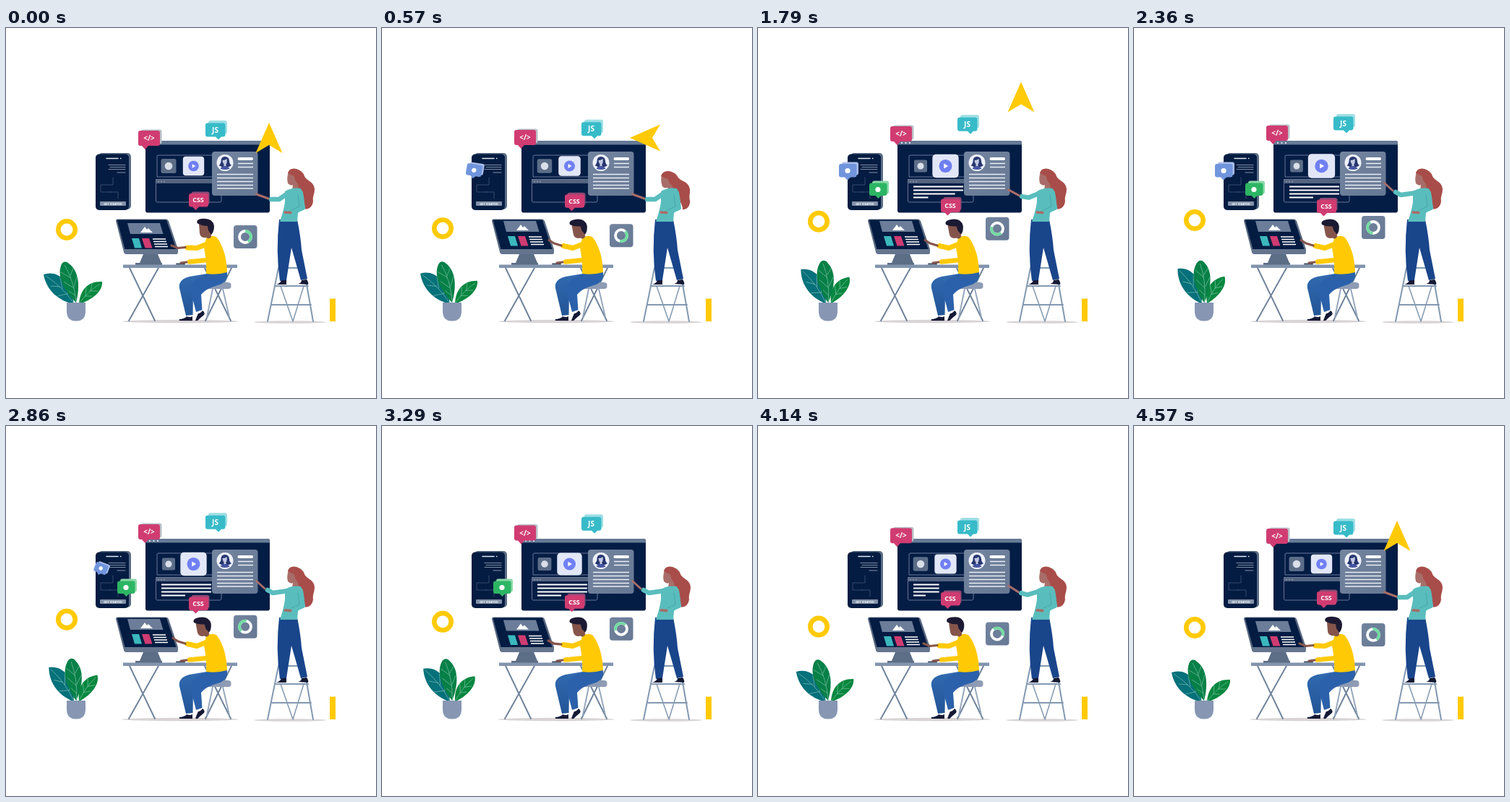
Write an HTML page that moves like this. It is 512 px wide and 512 px high and loops after 4640 ms.

```html
<!DOCTYPE html>
<html lang="en">
<head>
<meta charset="utf-8">
<title>Design team</title>
<style>
html, body { margin: 0; width: 100%; height: 100%; overflow: hidden; background: #fff }
svg { display: block; width: 100%; height: 100% }
text { font: 700 10px "Open Sans", "Noto Sans", sans-serif; fill: #fff; text-anchor: middle }
.line { fill: none; stroke-linecap: round; stroke-linejoin: round }
.vein { fill: none; stroke: #a9d6c6; stroke-width: .5 }
.skin { stroke: #a86d68 }
.tan { stroke: #85554b }
.teal { stroke: #5abdbd }
.gold { stroke: #ffca05 }
</style>
</head>
<body>
<svg viewBox="0 0 512 512">
  <defs>
    <linearGradient id="slate" x2="1" y2="1"><stop stop-color="#73849f"/><stop offset="1" stop-color="#667893"/></linearGradient>
    <linearGradient id="denim" x2="0" y2="1"><stop stop-color="#326bb2"/><stop offset="1" stop-color="#225596"/></linearGradient>
    <clipPath id="screen"><path d="M153 265H222L236 306H164Z"/></clipPath>
  </defs>

  <ellipse cx="241" cy="406" rx="81" ry="2.2" fill="#d8d4d5"/>
  <ellipse cx="393" cy="407" rx="50" ry="1.8" fill="#d8d4d5"/>
  <path fill="#ffca05" d="M448 374.5h8v31.5h-8z"/>
  <circle id="ring" cx="84" cy="279" r="11.700" fill="none" stroke="#ffca05" stroke-width="6.600"/>

  <!-- plant -->
  <g id="leafL">
    <path fill="#06717a" d="M94 382C74 378 56 364 52 341C69 335 88 346 94 382Z"/>
    <path class="vein" d="M93 380Q78 358 55 343M78 361L75 345M85 369L85 355M75 358L62 357M84 368L71 371"/>
  </g>
  <g id="leafR">
    <path fill="#07873f" d="M101 382C102 363 113 350 133 351C134 364 120 376 101 382Z"/>
    <path class="vein" d="M102 380Q115 363 130 354M110 370L111 359M117 363L119 354M109 371L119 371M116 364L127 364"/>
  </g>
  <g id="leafM">
    <path fill="#078047" d="M97 380C84 367 70 347 76 329C78 323 83 322 87 326C101 336 103 358 97 380Z"/>
    <path class="vein" d="M97 378Q94 350 81 328M94 358L98 344M89 343L93 332M94 360L80 351M90 346L76 338M96 370L87 364"/>
  </g>
  <path fill="#8797b3" d="M84 380h26v12q0 13.500-13 13.500t-13-13.500z"/>

  <!-- phone -->
  <rect x="128" y="173" width="45" height="78" rx="5" fill="#5b6c86"/>
  <rect x="124" y="174.500" width="46" height="77.500" rx="5" fill="#041c41"/>
  <path class="line" stroke="#dfe5ef" d="M139 180.500h16M158.500 180.500h.5" stroke-width="1.500"/>
  <path class="line" stroke="#8e9cb3" stroke-width=".9" d="M142 189.500h23M144 192.500h21M142 195.500h23M154 200h11"/>
  <path class="line" stroke="#3c4f70" stroke-width=".9" d="M148 207v10h-17v10h14M143 227h12v9"/>
  <rect x="130" y="240" width="36" height="6" rx="1" fill="#8292aa"/>
  <text x="148" y="244.600" style="font-size:4px">GET STARTED</text>

  <!-- board -->
  <rect x="193" y="156" width="172" height="99.500" rx="3" fill="#031d45"/>
  <path fill="#667a96" d="M193 161.500v-2.500q0-3 3-3h166q3 0 3 3v2.500z"/>
  <path class="line" stroke="#fff" stroke-width="2" d="M199 159h0M204.500 159h0M210 159h0"/>
  <path fill="none" stroke="#777f9f" stroke-width=".9" d="M290 176H211q-2 0-2 2V206H290M207.500 209.500H298V239q0 2-2 2H209.500q-2 0-2-2z"/>
  <path fill="#53647f" d="M208 210h90v5h-90z"/>
  <path class="line" stroke="#c4cddb" stroke-width="1.300" d="M211 212.500h0M215 212.500h0M219 212.500h0"/>
  <path id="typed" fill="none" stroke="#fff" stroke-width="1.800"/>
  <g id="photo">
    <rect x="-10.500" y="-10" width="21" height="20" rx="2.500" fill="#5c6d88"/>
    <circle r="5.300" fill="#d9dfe8"/>
  </g>
  <g id="video">
    <rect x="-14.700" y="-13.200" width="29.400" height="26.400" rx="4" fill="#e2e7f8"/>
    <circle r="7.300" fill="#7080f2"/>
    <path fill="#fff" d="M-1.800-2.800L2.900 0-1.800 2.800z"/>
  </g>
  <rect x="285" y="171" width="63.500" height="61" rx="4" fill="url(#slate)"/>
  <circle cx="303" cy="186.500" r="11.500" fill="#eef1fa"/>
  <path fill="#27366f" d="M294.500 190q3-2 3-6q0-6 5.500-6t6 6q0 4 3 6q-3 3-8.500 2q-5 1-9-2z"/>
  <path fill="#c3c9e3" d="M299.500 183q4 0 6-2q1 5-1 7.500v3h-3v-3q-2-2.500-2-5.500z"/>
  <path fill="#4355a1" d="M296.500 194.500q2-3.500 6.500-3.500t6.500 3.500q-6.500 3-13 0z"/>
  <path class="line" stroke="#fff" stroke-width="4" d="M322.500 181h17.500"/>
  <path stroke="#e9edf5" stroke-width="1.500" d="M321 187.500h21M321 192.500h21M292 202.500h50M292 207.500h50M292 212.500h50M292 217.500h50M292 222h50"/>

  <path id="cursor" fill="#ffca05" d="M0-21L18.500 21 0 10-18.500 21z"/>

  <!-- labels -->
  <g id="tagCode">
    <rect x="187" y="140.500" width="28.500" height="20" rx="3" fill="#b9c0c8"/>
    <path fill="#d03c71" d="M186 142h24q3 0 3 3v15q0 3-3 3h-13l-4.500 5-4.500-5h-2q-3 0-3-3v-15q0-3 3-3z"/>
    <text x="198" y="156">&lt;/&gt;</text>
  </g>
  <g id="tagJs">
    <rect x="280" y="128" width="26" height="18.500" rx="3" fill="#9fdfe5"/>
    <path fill="#38bbc9" d="M279 131.500h21.500q3 0 3 3v13q0 3-3 3h-2.500l-4 4-4-4h-11q-3 0-3-3v-13q0-3 3-3z"/>
    <text x="289.500" y="144.700">JS</text>
  </g>
  <g id="tagCss">
    <rect x="256.500" y="226.500" width="25" height="18" rx="3" fill="#8e4a75"/>
    <path fill="#d03c71" d="M256 229h21q3 0 3 3v12.500q0 3-3 3h-10l-4.500 4.500-4.500-4.500h-2q-3 0-3-3v-12.500q0-3 3-3z"/>
    <text x="266" y="241.300" style="font-size:9px">CSS</text>
  </g>
  <g id="tagBlue">
    <rect x="116" y="185.500" width="23" height="18" rx="3" fill="#a9bfe9"/>
    <path fill="#7195dd" d="M115 188h18.500q3 0 3 3v12.500q0 3-3 3h-5.500l-4 4-4-4h-5q-3 0-3-3v-12.500q0-3 3-3z"/>
    <circle cx="124" cy="197.500" r="3.600" fill="#fff"/>
  </g>
  <g id="tagGreen">
    <rect x="158" y="211.500" width="23" height="18" rx="3" fill="#8bd9a8"/>
    <path fill="#2cb563" d="M157 214.500h18.500q3 0 3 3v11.500q0 3-3 3h-5l-4 4-4-4h-5.500q-3 0-3-3v-11.500q0-3 3-3z"/>
    <circle cx="166" cy="223.500" r="3.600" fill="#fff"/>
  </g>

  <!-- chart -->
  <g id="chart">
    <rect x="315" y="273" width="32.500" height="32" rx="4" fill="url(#slate)"/>
    <g fill="none" stroke-width="3.800">
      <circle cx="331" cy="289" r="8" stroke="#fff"/>
      <path id="slice" stroke="#70dca0" d="M331 281A8 8 0 0 1 335 295.900"/>
    </g>
  </g>

  <!-- desk -->
  <path class="line" stroke="#6c8099" stroke-width="1.900" d="M171 332L206 405M211 332L170 405M312 332L276 405M275 332L311 405"/>
  <path class="line" stroke="#93a5bb" stroke-width="1.900" d="M286 361L278 400M300 361L309 400"/>
  <path fill="#5a6a82" d="M155 264.500H221Q224 264.500 225 267L238 306V310Q238 313 235 313H167Q164 313 163 310L152 267Q152 264.500 155 264.500Z"/>
  <path fill="#041c42" d="M153.500 265.500H222L235.500 306H164.500Z"/>
  <g clip-path="url(#screen)"><g id="page">
    <path fill="#6b7d99" d="M168 270H213L217.500 285H172Z"/>
    <path fill="#fff" d="M186 283l6-8 3 4 2-2 6 6z"/>
    <path fill="#3bb8be" d="M174 291h10l4 13.500h-10z"/>
    <path fill="#d03c71" d="M188 291h10l4.500 13.500h-10z"/>
    <path stroke="#fff" stroke-width="1.500" d="M203 292h18M204 295.500h18M205 299h18M206 302.500h18"/>
  </g></g>
  <path fill="#65758d" d="M163.500 306H238V310Q238 313 235 313H167Q164 313 163 310Z"/>
  <path fill="#5c6d86" d="M190 313h20l5 12h1v3h-37v-3h6z"/>
  <path fill="#8294ad" d="M162 327.500h158v4.500h-158z"/>
  <path class="line" stroke="#3d4d63" stroke-width="2" d="M236 326.500h11"/>

  <!-- seated man -->
  <rect x="270" y="352" width="41.500" height="9" rx="4" fill="#8d9bb4"/>
  <path fill="url(#denim)" d="M290 338L254 344Q238 348 240 360L249 398L258.500 397L259 368L290 356Z"/>
  <path fill="#2a61aa" d="M306 337L276 341Q253 350 256 366L263 393L271.500 390L270 369Q276 361 290 357Q304 354 306 344Z"/>
  <path fill="#151a35" d="M240 403q8-1 10-4q4 2 8 0v6h-17q-2 0-1-2zM262 405q2-6 4-10q3 0 6-4q4 3 2 6q-6 5-9 8z"/>
  <path class="line gold" id="sleeve" stroke-width="7"/>
  <path class="line tan" id="hand" stroke-width="3.200"/>
  <path fill="#ffca05" d="M277 291Q285 285 292 290Q305 308 306 338Q292 342 277 340Q278 324 274 304Z"/>
  <path fill="none" stroke="#ecb900" d="M283 303L278 319"/>
  <path class="line gold" stroke-width="6.500" d="M286 302L279 321L254 323.500"/>
  <path class="line tan" stroke-width="3" d="M250 324L242 325"/>
  <g id="manHead">
    <path fill="#85554b" d="M267 271H283L284 289Q281 293 277 290Q269 291 268 284Z"/>
    <path fill="#1c1a33" d="M264.500 270Q263 265 270 264Q286 262 288 274Q288 282 284 286L280 280L279 274Q271 274 264.500 270Z"/>
  </g>

  <!-- ladder -->
  <g class="line" stroke="#8299b1" stroke-width="2">
    <path stroke-width="1.500" d="M380 357L397 406L412 357"/>
    <path d="M377 332L362 406M412 332L425 406M372 357H418M367 383H422M377 332H412"/>
  </g>

  <!-- standing woman -->
  <path class="line teal" id="reach" stroke-width="6.500"/>
  <path class="line skin" id="point" stroke-width="3"/>
  <path fill="#19458b" d="M379 265H403Q408 290 409 307L417 347L408 349L395 304L388 349L379 350Q373 310 378 265Z"/>
  <path fill="#151a35" d="M374 355q6-2 7-6h7v6zM404 354q5-1 5-5l7-1q3 4 2 7z"/>
  <g id="womanHead">
    <path fill="#a84d49" d="M390 201Q392 193 402 195Q411 198 413 205C416 212 426 212 427 223C427 230 424 233 425 240C424 248 418 252 413 250C415 246 410 240 411 232Q404 228 402 218Z"/>
    <path fill="#a86d68" d="M391 200Q388 207 390 215Q394 219 397 217L396 224L406 224L403 214L401 205Q396 205 391 200Z"/>
    <path fill="#a84d49" d="M390 200Q397 193 405 200L404 216Q399 211 399 205Q394 204 390 200Z"/>
  </g>
  <path fill="#5abdbd" d="M386 226Q396 220 408 222Q413 230 413 248L404 256L403 268H379Q385 250 386 240Z"/>
  <path class="line teal" stroke-width="6" d="M408 228L411 249L398 254.500"/>
  <path fill="none" stroke="#47a6aa" stroke-width=".9" d="M404 231L406 247L395 252"/>
  <path class="line skin" stroke-width="3.400" d="M394 255.500L386 255"/>
</svg>
<script>
const LOOP = 4640, STEP = LOOP / 65;
const $ = id => document.getElementById(id);
const set = (id, name, value) => $(id).setAttribute(name, value);
const move = (id, value) => set(id, 'transform', value);
const mix = (a, b, k) => a + (b - a) * k;
const linear = (t, a, b) => Math.min(1, Math.max(0, (t - a) / (b - a)));
const ease = (t, a, b) => { const u = linear(t, a, b); return u * u * (3 - 2 * u); };
const pulse = (t, a, b, c, d) => ease(t, a, b) - ease(t, c, d);

function pop(id, x, y, size, turn) {
  move(id, `translate(${x} ${y}) rotate(${(1 - size) * turn}) scale(${size}) translate(${-x} ${-y})`);
}

function draw(t) {
  const sway = (1 - Math.cos(2 * Math.PI * t / LOOP)) / 2;
  move('ring', `translate(0 ${-13 * sway})`);
  move('chart', `translate(0 ${-13 * sway})`);
  move('tagCode', `translate(0 ${-7 * sway})`);
  move('tagJs', `translate(0 ${-9 * sway})`);
  move('tagCss', `translate(0 ${8.5 * sway})`);
  move('leafL', `rotate(${11 * sway} 97 381)`);
  move('leafM', `rotate(${11 * sway} 97 381)`);
  move('leafR', `rotate(${-13 * sway} 97 381)`);
  move('photo', `translate(225 191) scale(${1 - .16 * sway})`);
  move('video', `translate(259.5 191) scale(${1 + .27 * sway})`);
  move('slice', `rotate(${360 * t / LOOP} 331 289)`);

  pop('tagBlue', 138, 208, pulse(t, 170, 680, 2650, 3260), 80);
  pop('tagGreen', 158, 234, pulse(t, 700, 1200, 3350, 3950), 60);

  // cursor turns, lifts off and later fades back in
  const nod = pulse(t, 0, 570, 600, 1180);
  const lift = 8 * ease(t, 600, 1290) + 51 * ease(t, 1290, 1860);
  const home = t > 3000;
  move('cursor', `translate(364 ${home ? 152 : 152 - lift}) rotate(${-90 * nod})`);
  set('cursor', 'opacity', home ? ease(t, 4150, 4500) : 1 - ease(t, 1750, 2250));

  const wipe = 1 - linear(t, 3850, 4450);
  set('typed', 'd', [69, 69, 69, 33].map((w, i) => {
    const start = 900 + 150 * i;
    return `M215 ${219.5 + 5 * i}h${w * linear(t, start, start + 700) * wipe}`;
  }).join(''));

  const tap = pulse(t, 100, 550, 2900, 3700);
  const wristY = mix(304, 301.5, tap);
  set('sleeve', 'd', `M283 297L264 304.5L251 ${wristY}`);
  set('hand', 'd', `M248 ${wristY - .5}L238 ${mix(304.5, 298, tap)}L${mix(229, 231, tap)} ${mix(301, 293.5, tap)}`);
  move('page', `translate(0 ${-3 * tap})`);
  const lean = pulse(t, 100, 550, 3900, 4500);
  move('manHead', `translate(${-2.5 * lean} 0) rotate(${-6 * lean} 282 291)`);

  const raise = pulse(t, 1400, 2300, 3850, 4500);
  const wristX = mix(367, 362, raise);
  set('reach', 'd', `M391 228L${mix(378, 369, raise)} ${mix(237, 231, raise)}L${wristX} ${mix(237, 227, raise)}`);
  set('point', 'd', `M${wristX - 4} ${mix(236, 225, raise)}L346.5 ${mix(230, 214.5, raise)}`);
  move('womanHead', `translate(${-nod} ${3 * nod}) rotate(${-8 * nod} 400 222)`);
}

function tick() {
  const t = performance.now() % LOOP;
  draw(Math.floor((t + 3) / STEP) % 65 * STEP);
  requestAnimationFrame(tick);
}
tick();
</script>
</body>
</html>
```
